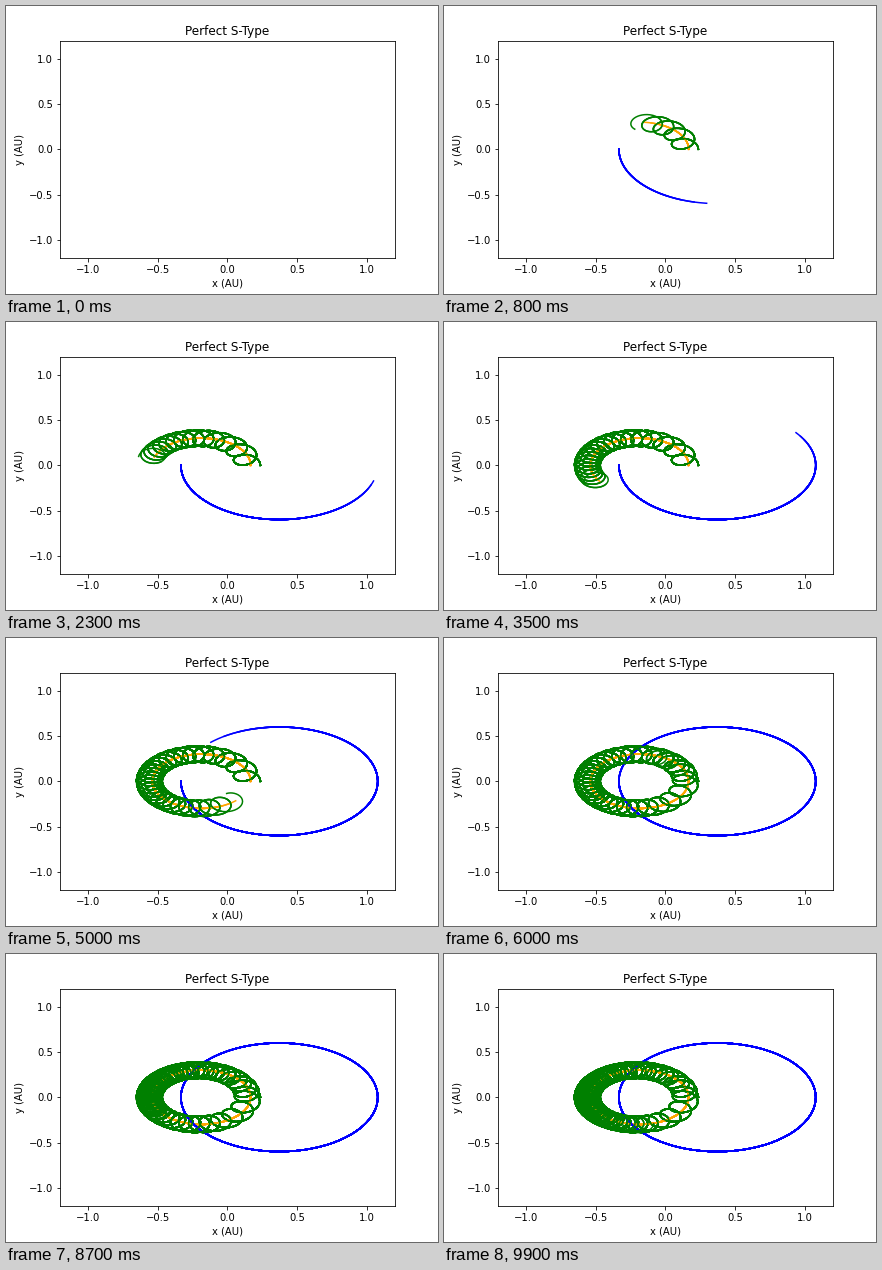
A matplotlib script that plays this animation: 432 by 288 pixels, repeating every 10 s.

```python
import numpy as np
import matplotlib.pyplot as plt
from matplotlib.animation import FuncAnimation

FRAMES = 100
SAMPLES = 20      # stored points per frame
SUBSTEPS = 4      # integrator steps per stored point
LAYERS = 24       # earlier strokes kept under the newest one

# Binary with G * total mass = 1, starting at periapsis
M1, M2 = 2 / 3, 1 / 3
SEP, ECC = 0.5, 0.5275
PERIOD_FRAMES = 53.6

# Planet around the heavier star, also at periapsis
PLANET_R, PLANET_ECC = 0.07, 0.2447


def accel(pos):
    star, mate, planet = pos
    d, p, q = mate - star, star - planet, mate - planet
    pull = d / abs(d) ** 3
    return np.array([M2 * pull, -M1 * pull,
                     M1 * p / abs(p) ** 3 + M2 * q / abs(q) ** 3])


def orbits():
    """Leapfrog integration; positions are complex numbers x + iy."""
    period = 2 * np.pi * (SEP / (1 - ECC)) ** 1.5
    dt = period / PERIOD_FRAMES / (SAMPLES * SUBSTEPS)
    speed = np.sqrt((1 + ECC) / SEP)
    swing = np.sqrt(M1 * (1 + PLANET_ECC) / PLANET_R)
    pos = np.array([M2 * SEP, -M1 * SEP, M2 * SEP + PLANET_R], complex)
    vel = 1j * np.array([M2 * speed, -M1 * speed, M2 * speed + swing])
    track = [pos.copy()]
    acc = accel(pos)
    for step in range(1, FRAMES * SAMPLES * SUBSTEPS + 1):
        vel += acc * dt / 2
        pos += vel * dt
        acc = accel(pos)
        vel += acc * dt / 2
        if step % SUBSTEPS == 0:
            track.append(pos.copy())
    return np.array(track).T


paths = orbits()

fig, ax = plt.subplots(figsize=(6, 4), dpi=72)
fig.subplots_adjust(left=0.125, right=0.9, bottom=0.125, top=0.88)
ax.set(xlim=(-1.2, 1.2), ylim=(-1.2, 1.2),
       xticks=np.arange(-1, 1.1, 0.5), yticks=np.arange(-1, 1.1, 0.5),
       xlabel="x (AU)", ylabel="y (AU)", title="Perfect S-Type")

layers = [[ax.plot([], [], color=c, lw=1.5)[0]
           for c in ("orange", "blue", "green")] for _ in range(LAYERS)]


def update(frame):
    # Strokes pile up, so older parts of each path look heavier
    for age, lines in zip(range(LAYERS - 1, -1, -1), layers):
        end = max(frame - age, 0) * SAMPLES
        for line, path in zip(lines, paths):
            part = path[:end + 1] if end else path[:0]
            line.set_data(part.real, part.imag)
    return [line for lines in layers for line in lines]


anim = FuncAnimation(fig, update, frames=FRAMES, interval=100,
                     init_func=lambda: update(0), repeat=True)
plt.show()
```
